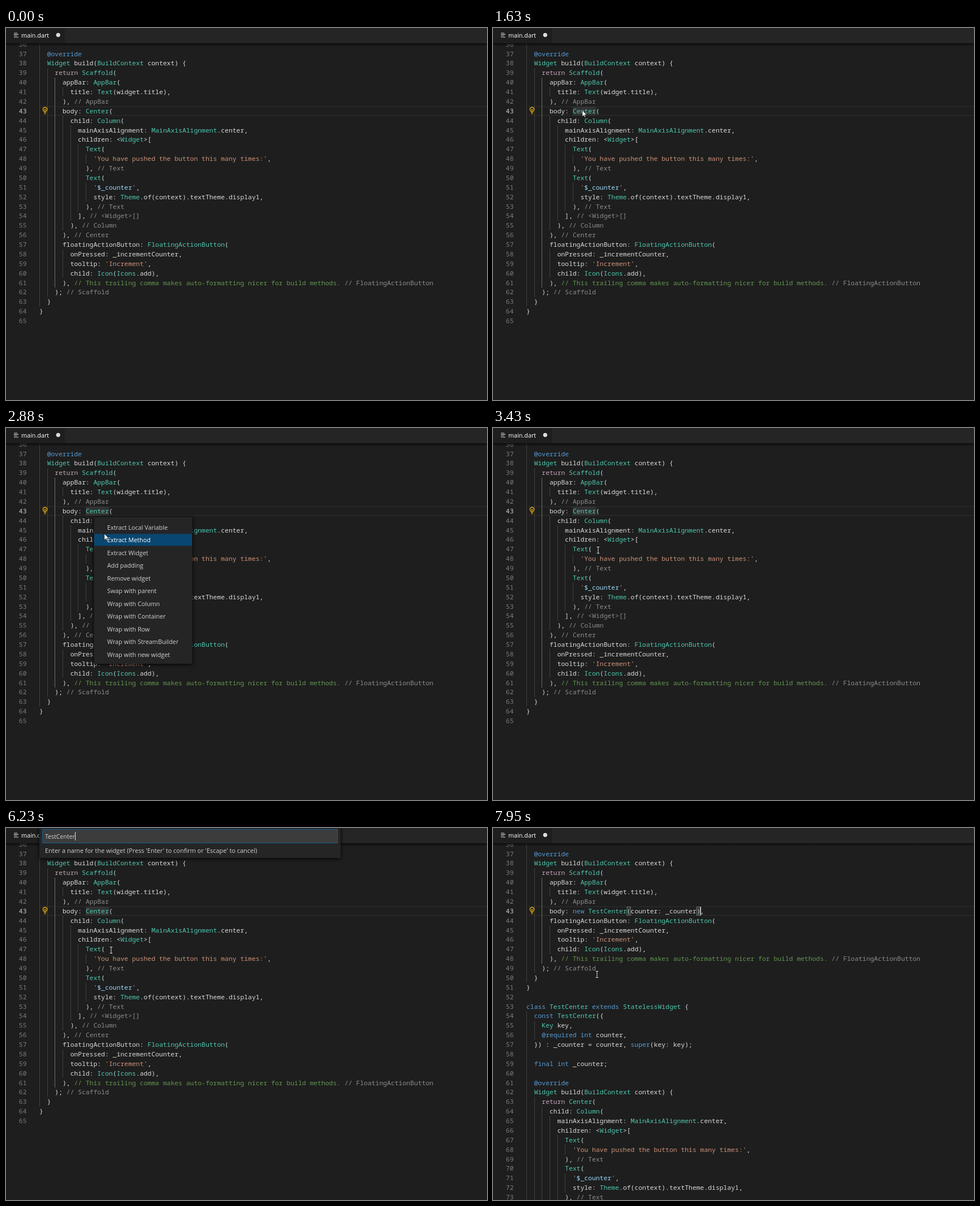
An HTML page for the animation above (8 s loop, 851 by 658 pixels).

```html
<!DOCTYPE html>
<html lang="en">
<head>
<meta charset="utf-8">
<title>Extract widget</title>
<style>
  html, body { margin: 0; width: 100%; height: 100%; overflow: hidden; background: #1e1e1e; }
  svg { display: block; width: 851px; height: 658px; }
  text { white-space: pre; }
  .code text { font: 11.4px "Noto Sans Mono", "DejaVu Sans Mono", monospace; fill: #dadada; }
  .code .num { fill: #7d7d7d; text-anchor: end; }
  .code .now { fill: #d0d0d0; }
  .ui { font: 10.8px "Open Sans", "Noto Sans", sans-serif; fill: #d2d2d2; }
  .key { fill: #569cd6; }
  .flow { fill: #c5a5b8; }
  .type { fill: #4ec9b0; }
  .str { fill: #ce9178; }
  .var { fill: #9cdcfe; }
  .note { fill: #629650; }
  .label { fill: #8c8c8c; }
  .guide { stroke: #404040; shape-rendering: crispEdges; }
  .guide.active { stroke: #6c6c6c; }
  .caret { fill: #d8d8d8; }
  .shade { filter: drop-shadow(0 1px 3px #000); }
  .link .hot { fill: #4e94ce; text-decoration: underline; }
</style>
</head>
<body>
<svg viewBox="0 0 851 658">
  <defs>
    <linearGradient id="fade" x1="0" y1="0" x2="0" y2="1">
      <stop offset="0" stop-color="#000" stop-opacity=".65"/>
      <stop offset="1" stop-color="#000" stop-opacity="0"/>
    </linearGradient>
  </defs>
  <rect width="851" height="658" fill="#1e1e1e"/>
  <path d="M59 139.2H851M59 154.6H851" stroke="#2a2a2a" stroke-width="1.5"/>
  <rect id="word" x="141" y="139.5" width="41.5" height="15" fill="#575757" opacity=".45"/>
  <g id="before" class="code"></g>
  <g id="after" class="code"></g>
  <g id="brackets" fill="#25302a" stroke="#8a8a8a" stroke-width=".8">
    <rect x="237" y="139.7" width="6.4" height="14.6"/>
    <rect x="360.2" y="139.7" width="6.4" height="14.6"/>
  </g>
  <g class="code" id="bracketText">
    <text x="236.8" y="150.85">(</text><text x="360" y="150.85">)</text>
  </g>
  <rect id="codeCaret" class="caret" y="139.5" width="1.4" height="15"/>

  <g fill="none" stroke="#dba70f" stroke-width="1.5">
    <path d="M67.3 147.6C66.6 146.3 65.4 145.6 65.4 143.9A3.6 3.6 0 0 1 72.6 143.9C72.6 145.6 71.4 146.3 70.7 147.6Z"/>
    <path d="M67 149.6H71M67.6 151.7H70.4M69 147V144.4M67.7 143.4L69 144.6 70.3 143.4" stroke-width="1.1"/>
  </g>

  <rect width="851" height="28" fill="#252526"/>
  <rect width="104" height="28" fill="#1e1e1e"/>
  <rect y="27" width="851" height="5" fill="url(#fade)"/>
  <path d="M14 9H20M14 11.4H22M14 13.8H19.5M14 16.2H22" stroke="#c8c8c8" stroke-width="1.1"/>
  <text class="ui" x="27" y="17" style="fill:#fff">main.dart</text>
  <circle cx="92.3" cy="12.3" r="3.6" fill="#dedede"/>

  <g id="menu">
    <rect class="shade" x="155.5" y="157.5" width="174" height="259.5" fill="#252526"/>
    <rect id="pick" x="156" width="173" height="21" fill="#094771"/>
  </g>

  <g id="prompt">
    <rect class="shade" x="59" y="-6" width="533" height="59" fill="#252526"/>
    <rect x="64.5" y="2.5" width="522" height="24" fill="#3c3c3c" stroke="#175f8f"/>
    <text id="typed" class="ui" x="69" y="19" style="font-size:10.6px"></text>
    <rect id="inputCaret" class="caret" y="7" width="1.1" height="15"/>
    <text class="ui" x="69" y="43.6" style="font-size:10.94px">Enter a name for the widget (Press 'Enter' to confirm or 'Escape' to cancel)</text>
  </g>

  <g id="mouse">
    <path id="beam" d="M-2.3-5.5H2.3M0-5.5V5.5M-2.3 5.5H2.3" stroke="#dcdcdc" fill="none"/>
    <path id="arrow" d="M0 0V11.2L2.6 8.8 4.2 12.6 5.9 11.9 4.3 8.2H7.8Z" fill="#fff" stroke="#000" stroke-width=".6"/>
    <path id="hand" d="M-1.2.8C-1.2-.6 1-.6 1 .8V5.3L5.8 6.3C7 6.6 7.4 7.3 7.2 8.5L6.4 12.2V14H.2L-3 9.6C-4 8.2-2.7 7.2-1.5 8.2L-1.2 8.6Z" fill="#fff" stroke="#000" stroke-width=".7"/>
  </g>
</svg>
<script>
const LOOP = 8000, FIRST = 36, LEFT = 59, PITCH = 16.875, CELL = 6.84;
const $ = id => document.getElementById(id);

// "~" starts an editor-made closing label
const head = [
  "",
  "  @override",
  "  Widget build(BuildContext context) {",
  "    return Scaffold(",
  "      appBar: AppBar(",
  "        title: Text(widget.title),",
  "      ), ~// AppBar"
];
const tail = [
  "      floatingActionButton: FloatingActionButton(",
  "        onPressed: _incrementCounter,",
  "        tooltip: 'Increment',",
  "        child: Icon(Icons.add),",
  "      ), // This trailing comma makes auto-formatting nicer for build methods. ~// FloatingActionButton",
  "    ); ~// Scaffold",
  "  }",
  "}",
  ""
];
const column = pad => [
  "child: Column(",
  "  mainAxisAlignment: MainAxisAlignment.center,",
  "  children: <Widget>[",
  "    Text(",
  "      'You have pushed the button this many times:',",
  "    ), ~// Text",
  "    Text(",
  "      '$_counter',",
  "      style: Theme.of(context).textTheme.display1,",
  "    ), ~// Text",
  "  ], ~// <Widget>[]",
  "), ~// Column"
].map(s => " ".repeat(pad) + s);

const oldCode = [...head, "      body: Center(", ...column(8), "      ), ~// Center", ...tail];
const newCode = [
  ...head,
  "      body: new TestCenter(counter: _counter),",
  ...tail,
  "class TestCenter extends StatelessWidget {",
  "  const TestCenter({",
  "    Key key,",
  "    @required int counter,",
  "  }) : _counter = counter, super(key: key);",
  "",
  "  final int _counter;",
  "",
  "  @override",
  "  Widget build(BuildContext context) {",
  "    return Center(",
  ...column(6).slice(0, 10)
];

const esc = s => s.replace(/</g, "&lt;");
const span = (cls, s) => `<tspan class="${cls}">${esc(s)}</tspan>`;
const tokens = /('[^']*')|(\/\/.*)|(@\w+|\b(?:new|class|extends|const|final|int|super)\b)|(\breturn\b)|(\b[A-Z]\w*)|</g;

function paint(line) {
  const [code, label] = line.split("~");
  const html = code.replace(tokens, (all, str, note, key, flow, type) =>
    str ? span("str", str).replace(/\$\w+/, v => span("var", v)) :
    note ? span("note", note) :
    key ? span("key", key) :
    flow ? span("flow", flow) :
    type ? span(type === "Center" ? "type hot" : "type", type) : esc(all));
  return html + (label ? span("label", label) : "");
}

function depth(lines, i) {
  while (i < lines.length && !lines[i]) i++;
  return i < lines.length ? lines[i].search(/\S/) / 2 : 0;
}

function render(lines) {
  const levels = lines.map((_, i) => depth(lines, i));
  const current = 43 - FIRST;
  const endOffset = levels.slice(current).findIndex(d => d < 3);
  return lines.map((line, i) => {
    const base = 49.6 + (i - 1) * PITCH, top = 37 + (i - 1) * PITCH;
    let out = "";
    for (let k = 0; k < levels[i]; k++) {
      const active = k === 2 && i >= 4 && i < current + endOffset;
      const x = Math.round(LEFT + k * 2 * CELL) + .5;
      out += `<path class="guide${active ? " active" : ""}" d="M${x} ${top}v${PITCH}"/>`;
    }
    out += `<text class="num${i === current ? " now" : ""}" x="36.5" y="${base}">${FIRST + i}</text>`;
    return out + `<text x="${LEFT}" y="${base}">${paint(line)}</text>`;
  }).join("");
}

$("before").innerHTML = render(oldCode);
$("after").innerHTML = render(newCode);
const lateLabels = [...$("after").querySelectorAll(".label")].slice(3);

const rowY = i => 175.5 + i * 22.55;
const items = ["Extract Local Variable", "Extract Method", "Extract Widget", "Add padding", "Remove widget", "Swap with parent",
  ..."Column,Container,Row,StreamBuilder,new widget".split(",").map(s => "Wrap with " + s)];
$("menu").insertAdjacentHTML("beforeend",
  items.map((s, i) => `<text class="ui" x="179" y="${rowY(i) + 4}">${s}</text>`).join(""));
const itemTexts = $("menu").querySelectorAll("text");

// time, x, y
const path = [
  [130, 744, 650], [280, 600, 540], [480, 330, 325], [680, 165, 185], [800, 133, 148],
  [930, 156, 140], [1000, 163, 138], [1180, 161, 143], [1430, 158, 145.5],
  [2640, 158, 145.5], [2780, 165, 166], [2880, 174, 187], [2980, 182, 207], [3060, 186, 216],
  [7760, 186, 216], [7860, 185.5, 236], [7950, 184, 259]
];
const keys = [4180, 4370, 4570, 4670, 5370, 5670, 5760, 6000, 6120, 6230];
const NAME = "TestCenter";

function mouseAt(t) {
  const i = path.findIndex(p => p[0] >= t);
  if (i < 0) return path[path.length - 1].slice(1);
  if (i === 0) return path[0].slice(1);
  const [t0, x0, y0] = path[i - 1], [t1, x1, y1] = path[i];
  const f = (t - t0) / (t1 - t0);
  return [x0 + (x1 - x0) * f, y0 + (y1 - y0) * f];
}

const within = (t, a, b) => t >= a && t < b;
const show = (el, on) => el.setAttribute("opacity", +on);

function draw(t) {
  const done = t >= 6910;
  show($("before"), !done);
  show($("after"), done);
  $("before").classList.toggle("link", within(t, 1180, 1580));
  $("word").setAttribute("opacity", within(t, 1380, 6910) ? (t < 1580 ? .6 : .35) : 0);
  show($("brackets"), t >= 6960);
  show($("bracketText"), t >= 6960);
  lateLabels.forEach(el => show(el, t >= 7340));

  $("codeCaret").setAttribute("x", done ? 366.6 : 155);
  show($("codeCaret"), within(t, 1380, 1630) || within(t, 6910, 7440) || t >= 7900);

  const [x, y] = mouseAt(Math.floor(t / 10) * 10);
  const hand = within(t, 1180, 1580), arrow = within(t, 1580, 3340);
  $("mouse").setAttribute("transform", `translate(${x} ${y})`);
  show($("mouse"), t >= 130);
  show($("hand"), hand);
  show($("arrow"), arrow);
  show($("beam"), !hand && !arrow);

  $("menu").setAttribute("opacity", within(t, 2050, 3340) ? (t < 2100 ? .55 : 1) : 0);
  const row = Math.floor((y - 164.2) / 22.55);
  show($("pick"), row >= 0);
  $("pick").setAttribute("y", rowY(row) - 10.8);
  itemTexts.forEach((el, i) => el.style.fill = i === row ? "#fff" : "");

  const open = within(t, 3480, 6780);
  $("prompt").setAttribute("opacity", open ? (t < 3530 || t >= 6730 ? .55 : 1) : 0);
  const count = keys.filter(k => k <= t).length;
  $("typed").textContent = NAME.slice(0, count);
  $("inputCaret").setAttribute("x", 69 + (count ? $("typed").getComputedTextLength() : 0));
  show($("inputCaret"), !within(t, 3950, 4180) && !within(t, 5180, 5370) && t < 6730);
}

const start = performance.now();
function tick() {
  draw((performance.now() - start) % LOOP);
  requestAnimationFrame(tick);
}
tick();
</script>
</body>
</html>
```
